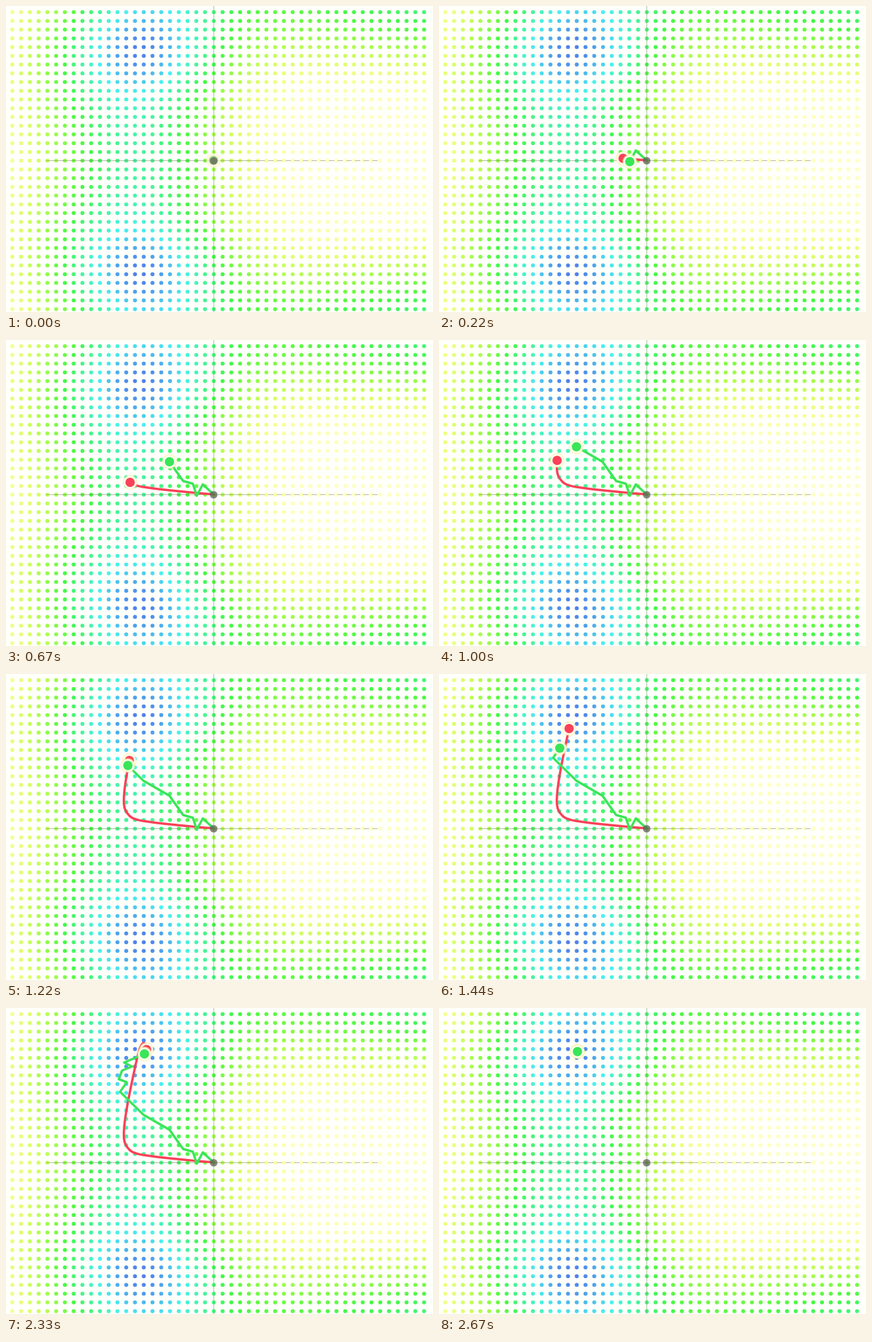
These frames come from a looping animation (640 px wide and 460 px high, 2780 ms). An HTML page with a canvas:

```html
<!DOCTYPE html>
<html lang="en">
<head>
<meta charset="utf-8">
<title>Two optimisers on a loss surface</title>
<style>
  html, body { margin: 0; width: 100%; height: 100%; overflow: hidden; background: #fffffb; }
  canvas { display: block; }
</style>
</head>
<body>
<canvas id="stage" width="640" height="460"></canvas>
<script>
const W = 640, H = 460, LOOP = 2780, FPS = 9, LAST = 24;
const MID = { x: 311.3, y: 232.6 };
const PITCH = 13.13;
const ctx = document.getElementById('stage').getContext('2d');

// key points: step, x, y
const RED = {
  color: '#fa4158', smooth: true,
  keys: [[0, 311, 232], [4, 220, 223], [6, 186, 214], [9, 177, 181],
    [13, 195, 82], [17, 205, 53], [19, 212, 59], [LAST, 207.5, 65.5]]
};
const GREEN = {
  color: '#3ae558', smooth: false,
  keys: [[0, 311, 232], [1, 295, 217], [2, 286, 234], [3, 280, 216], [4, 265.5, 212],
    [6, 245, 183], [9, 206, 160.5], [12, 171, 126], [13, 181, 111.5], [14, 169, 107],
    [15, 174, 94], [17, 189, 88], [19, 177, 82], [21, 207.5, 69], [LAST, 207.5, 65.5]]
};

const bell = (d, s) => Math.exp(-((d / s) ** 2));
const clamp = v => Math.min(1, Math.max(0, v));
const ease = p => p * p * (3 - 2 * p);

// a valley along the left, two wells in it, and lower right corners
function depth(x, y) {
  const d = Math.abs(y - MID.y);
  const axis = 198 - 0.26 * d + 0.0014 * d * d;
  const corner = ease(clamp((x - 180) / 220)) * (0.65 + (x - 400) / 500);
  return 90 * bell(x - axis, 113)
    + 72 * bell(x - 208, 115) * bell(d - 167, 72)
    + 72 * corner * bell(240 - d, 75);
}

function dotColor(v) {
  const light = 62 + 26 * Math.exp(-v / 13);
  return `hsl(${60 + v}, ${100 - v / 8}%, ${light}%)`;
}

function disc(g, x, y, r, fill) {
  g.beginPath();
  g.arc(x, y, r, 0, Math.PI * 2);
  g.fillStyle = fill;
  g.fill();
}

function line(g, x1, y1, x2, y2, color, dash = []) {
  g.setLineDash(dash);
  g.strokeStyle = color;
  g.beginPath();
  g.moveTo(x1, y1);
  g.lineTo(x2, y2);
  g.stroke();
}

function makeField() {
  const layer = document.createElement('canvas');
  layer.width = W;
  layer.height = H;
  const g = layer.getContext('2d');
  g.fillStyle = '#fffffb';
  g.fillRect(0, 0, W, H);
  for (let y = 9.3; y < H; y += PITCH) {
    for (let x = 9.5; x < W - 6; x += PITCH) disc(g, x, y, 3, dotColor(depth(x, y)));
  }
  line(g, 311.5, 0, 311.5, H, 'rgba(105,165,95,.6)');
  line(g, 60, 232.5, 380, 232.5, 'rgba(110,125,80,.5)');
  line(g, 380, 232.5, 559, 232.5, 'rgba(110,115,80,.5)', [8, 5]);
  return layer;
}
const field = makeField();

// position at step t: straight pieces, or a cubic through the key points
function at({ keys, smooth }, t) {
  let i = 0;
  while (i < keys.length - 2 && t >= keys[i + 1][0]) i++;
  const a = keys[i], b = keys[i + 1], span = b[0] - a[0];
  const p = (t - a[0]) / span, q = 1 - p;
  const slope = (j, c) => {
    const before = keys[j - 1], after = keys[j + 1];
    return before && after ? (after[c] - before[c]) / (after[0] - before[0]) : 0;
  };
  return [1, 2].map(c => {
    if (!smooth) return a[c] * q + b[c] * p;
    return a[c] * ease(q) + b[c] * ease(p)
      + span * p * q * (q * slope(i, c) - p * slope(i + 1, c));
  });
}

function trail(run, k) {
  ctx.beginPath();
  for (let t = 0; t <= k; t += 0.25) ctx.lineTo(...at(run, t));
  ctx.strokeStyle = run.color;
  ctx.lineWidth = 3.5;
  ctx.lineJoin = ctx.lineCap = 'round';
  ctx.stroke();
}

function ball(run, k) {
  const [x, y] = at(run, k);
  disc(ctx, x, y, 11, 'rgba(250,240,150,.6)');
  disc(ctx, x, y, 9.7, 'rgba(255,255,244,.9)');
  disc(ctx, x, y, 7, run.color);
}

function draw(k) {
  const runs = [RED, GREEN];
  ctx.drawImage(field, 0, 0);
  ctx.globalAlpha = clamp((LAST - k) / 2);
  runs.forEach(run => trail(run, k));
  ctx.globalAlpha = clamp(0.4 + k);
  runs.forEach(run => ball(run, k));
  ctx.globalAlpha = 1;
  disc(ctx, MID.x, MID.y, 5.7, 'rgba(90,90,80,.72)');
}

// nine pictures a second, each start rounded to 10 ms
const stepAt = t => Math.min(LAST, Math.floor((t + 5) * FPS / 1000));

const start = performance.now();
function tick() {
  draw(stepAt((performance.now() - start) % LOOP));
  requestAnimationFrame(tick);
}
tick();
</script>
</body>
</html>
```
